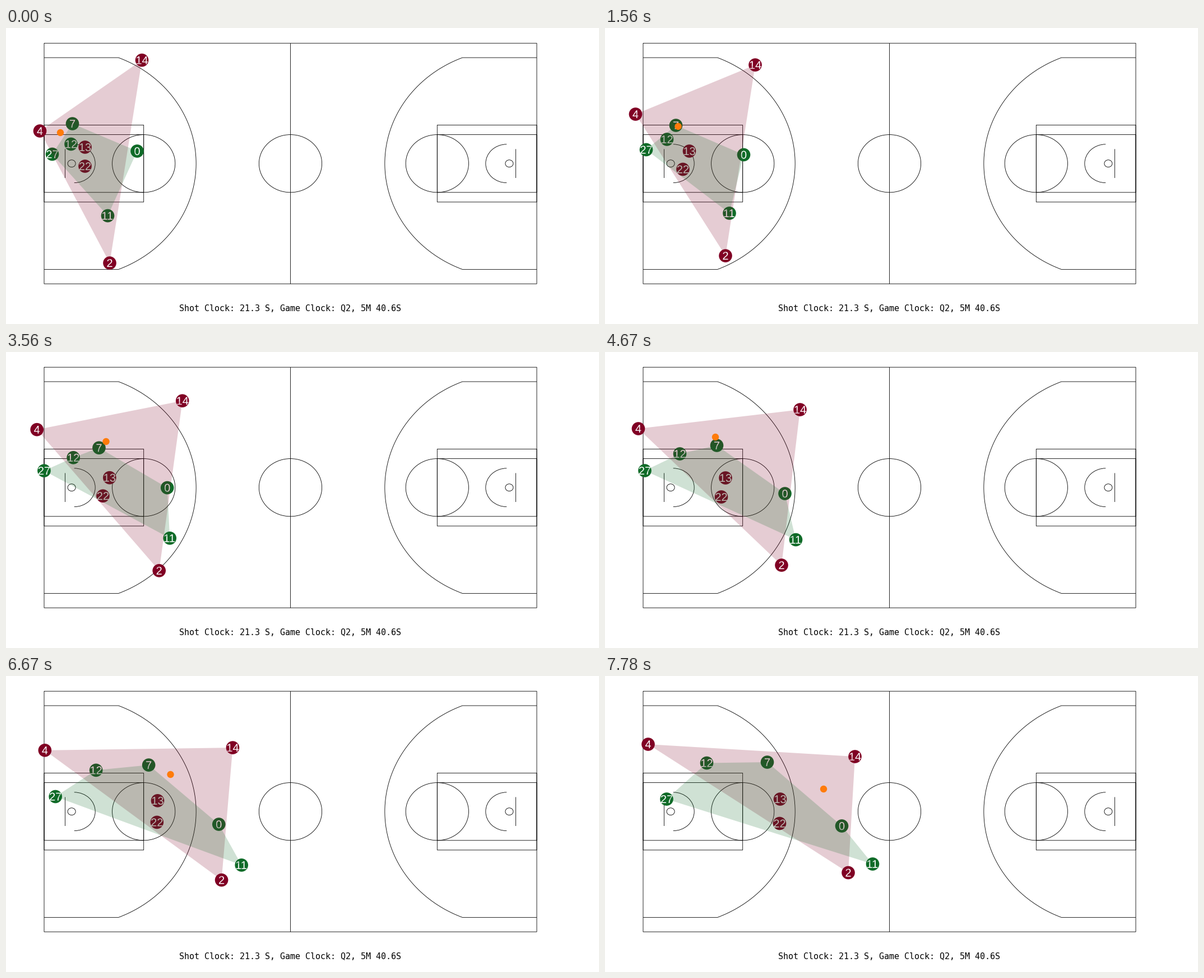
A matplotlib script that plays this animation: 1058 px wide and 529 px high, repeating every 8 s.

```python
import matplotlib.pyplot as plt
import numpy as np
from matplotlib.animation import FuncAnimation
from matplotlib.patches import Arc, Circle, Ellipse, PathPatch, Polygon
from matplotlib.textpath import TextPath
from matplotlib.transforms import Affine2D

W, H, DPI = 1058, 529, 100
FRAMES, LOOP_MS = 36, 8000
PX = 72 / DPI                      # points per pixel
FT_X, FT_Y = 879 / 94, 430 / 50    # pixels per foot
LEFT, TOP = 68, 27.2
RED, GREEN, ORANGE = "#800024", "#0f6b28", "#ff7b0a"

# Each player runs along a cubic through four spots.
RUN_TIMES = (0, 7, 23, 38)
REDS = {
    "14": [(242.5, 57.5), (268, 66), (348, 103), (446, 144)],
    "4": [(60.5, 184), (54.5, 154), (59.5, 137), (77, 122)],
    "13": [(141, 213), (150.5, 220), (215, 225), (312.5, 220)],
    "22": [(141, 247), (139, 252.5), (207.5, 259), (311.5, 263.5)],
    "2": [(185, 420), (215, 407), (315, 381), (434, 351.5)],
}
GREENS = {
    "7": [(118.5, 171), (126.5, 174), (199.5, 167), (289.5, 154)],
    "12": [(116, 207.5), (110.5, 199), (133.5, 182), (181.5, 155.5)],
    "27": [(82.5, 225.5), (73.5, 217.5), (71, 212), (110, 220)],
    "0": [(234, 220), (247.5, 226.5), (321, 253), (422.5, 268)],
    "11": [(181.5, 335.5), (222, 331), (340.5, 335.5), (477.5, 336)],
}
# The ball is carried, then passed.
BALL_TIMES = (0, 17, 23, 27, 32, 38)
BALL_X = (97, 178.5, 197, 223, 293.5, 390)
BALL_Y = (187, 160, 152, 159, 176, 202)


def sample_time(step):
    """The tracking drops one sample after every ten steps."""
    return step + max(step - 1, 0) // 10


def convex_hull(points):
    pts = sorted(map(tuple, points))

    def chain(seq):
        out = []
        for x, y in seq:
            while len(out) > 1:
                (x0, y0), (x1, y1) = out[-2:]
                if (x1 - x0) * (y - y0) - (y1 - y0) * (x - x0) > 0:
                    break
                out.pop()
            out.append((x, y))
        return out[:-1]

    return chain(pts) + chain(pts[::-1])


fig = plt.figure(figsize=(W / DPI, H / DPI), dpi=DPI, facecolor="white")
ax = fig.add_axes([0, 0, 1, 1])
ax.set_xlim(0, W)
ax.set_ylim(H, 0)
ax.axis("off")

STROKE = dict(color="black", lw=0.85 * PX, snap=False, zorder=1)


def court(x, y):
    """Court feet to stage pixels."""
    return LEFT + FT_X * np.asarray(x), TOP + FT_Y * np.asarray(y)


def line(xs, ys):
    ax.plot(*court(xs, ys), solid_joinstyle="miter", solid_capstyle="butt",
            **STROKE)


def box(x0, y0, x1, y1):
    line([x0, x1, x1, x0, x0], [y0, y0, y1, y1, y0])


def oval(x, r):
    ax.add_patch(Ellipse(court(x, 25), 2 * r * FT_X, 2 * r * FT_Y,
                         fill=False, **STROKE))


def draw_half(mirrored):
    def mx(x):
        return 94 - x if mirrored else x

    for half_width in (8, 6):
        box(mx(0), 25 - half_width, mx(19), 25 + half_width)
    oval(mx(19), 6)
    oval(mx(5.25), 0.75)
    line([mx(4), mx(4)], [22, 28])

    turn = 180 if mirrored else 0
    ax.add_patch(Arc(court(mx(5.75), 25), 8 * FT_X, 8 * FT_Y,
                     theta1=turn - 90, theta2=turn + 90, **STROKE))

    reach = np.arcsin(22 / 23.75)
    a = np.linspace(-reach, reach, 160)
    line(mx(np.r_[0, 5.25 + 23.75 * np.cos(a), 0]),
         np.r_[3, 25 + 23.75 * np.sin(a), 47])


box(0, 0, 94, 50)
line([47, 47], [0, 50])
oval(47, 6)
draw_half(False)
draw_half(True)

ax.text(507.3, 505.5, "Shot Clock: 21.3 S, Game Clock: Q2, 5M 40.6S",
        family="DejaVu Sans Mono", size=15.06 * PX, ha="center", va="baseline")


class Player:
    def __init__(self, number, spots, color):
        self.run = np.polyfit(RUN_TIMES, spots, 3)
        self.disc = ax.add_patch(Circle((0, 0), 11.8, fc=color, ec="none",
                                        zorder=2))
        glyphs = TextPath((0, 0), number, size=20,
                          prop={"family": "Liberation Sans"})
        self.half = 0.556 * 20 * len(number) / 2
        self.label = ax.add_patch(PathPatch(glyphs, fc="white", ec="none",
                                            zorder=3))

    def move(self, t):
        x, y = np.polyval(self.run, t)
        self.disc.center = x, y
        place = Affine2D().scale(1, -1).translate(x - self.half, y + 7)
        self.label.set_transform(place + ax.transData)
        return x, y


class Team:
    def __init__(self, runs, color, hull_z):
        self.players = [Player(n, spots, color) for n, spots in runs.items()]
        self.hull = ax.add_patch(Polygon([(0, 0)] * 3, fc=color, ec="none",
                                         alpha=0.2, zorder=hull_z))

    def move(self, t):
        self.hull.set_xy(convex_hull([p.move(t) for p in self.players]))


teams = [Team(REDS, RED, 4), Team(GREENS, GREEN, 5)]
ball = ax.add_patch(Circle((0, 0), 6.2, fc=ORANGE, ec="none", zorder=6))


def update(step):
    t = sample_time(step)
    for team in teams:
        team.move(t)
    ball.center = (np.interp(t, BALL_TIMES, BALL_X),
                   np.interp(t, BALL_TIMES, BALL_Y))
    return []


anim = FuncAnimation(fig, update, frames=FRAMES, init_func=lambda: update(0),
                     interval=LOOP_MS / FRAMES, repeat=True, repeat_delay=0)
plt.show()
```
